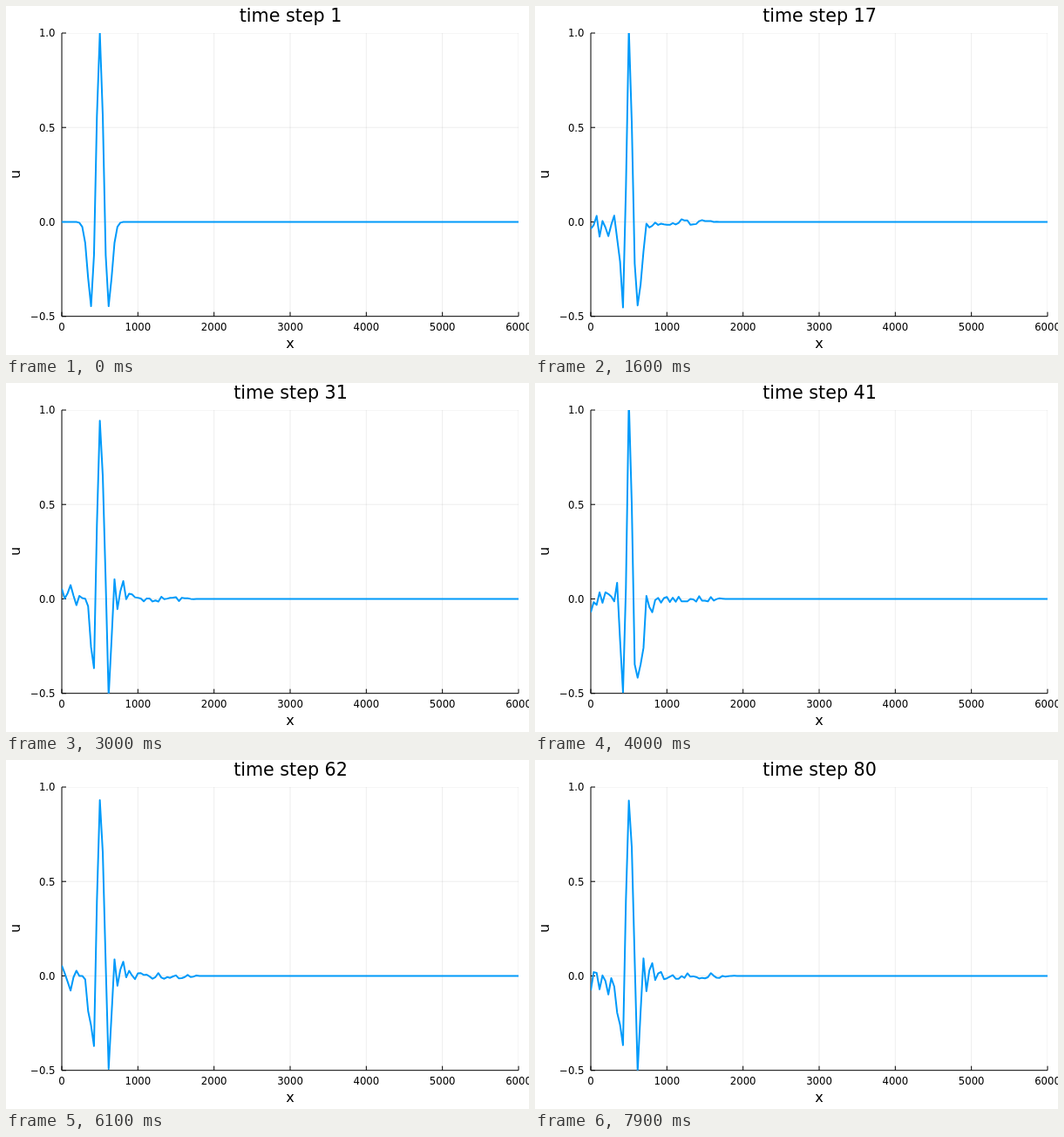
Write an HTML page with a canvas that moves like this. It is 600 px wide and 400 px high and loops after 8000 ms.

```html
<!DOCTYPE html>
<html lang="en">
<head>
<meta charset="utf-8">
<title>Wave over time</title>
<style>
html, body { margin: 0; width: 100%; height: 100%; overflow: hidden; background: #fff; }
canvas { display: block; }
</style>
</head>
<body>
<canvas width="600" height="400"></canvas>
<script>
const g = document.querySelector('canvas').getContext('2d');
const STEPS = 80, STEP_MS = 100, POINTS = 157, DX = 6000 / (POINTS - 1), PEAK = 13;
const LEFT = 64, RIGHT = 588, TOP = 31, BOTTOM = 355.7;
const px = x => LEFT + x / 6000 * (RIGHT - LEFT);
const py = u => BOTTOM - (u + 0.5) / 1.5 * (BOTTOM - TOP);

// Seeded random number in 0..1
function rand(n) {
  const v = Math.sin(n * 12.9898 + 4.1) * 43758.5453;
  return v - Math.floor(v);
}

// Ricker wavelet at grid point i
function pulse(i, squeeze = 1) {
  const a = 0.168 * (i - PEAK) ** 2 * squeeze;
  return (1 - 2 * a) * Math.exp(-a);
}

// Every third grid point moves freely, its neighbours much less
const freedom = i => [1, -0.25, 0.4][i % 3];

// Trapped oscillation just right of the peak, in antiphase left of the pulse
function swing(i, step) {
  const side = i < PEAK - 3 ? -1 : 1;
  const size = 0.27 * Math.exp(-(((i - 15) / 5.5) ** 2));
  return side * size * freedom(i) * Math.cos(2 * Math.PI * (step - 31) / 6.125);
}

// Small irregular waves behind a slowly advancing front
function ripple(i, step) {
  const size = i < PEAK - 3 ? 0.08 * freedom(i) : 0.015;
  const front = 36 + Math.sqrt(step);
  const phase = 2 * Math.PI * rand(i) + step * (0.4 + 0.8 * rand(i + 99));
  return size * Math.sin(phase) / (1 + Math.exp((i - front) / 1.2));
}

// The left flank narrows while the oscillations set in
function height(i, step) {
  const settled = 1 - Math.exp((1 - step) / 3);
  const rest = pulse(i, i < PEAK ? 2.1 : 1);
  return pulse(i) + settled * (rest - pulse(i) + swing(i, step) + ripple(i, step));
}

function line(x1, y1, x2, y2) {
  g.beginPath();
  g.moveTo(x1, y1);
  g.lineTo(x2, y2);
  g.stroke();
}

function text(str, x, y, size, align = 'center') {
  g.font = `${size}px "DejaVu Sans", sans-serif`;
  g.textAlign = align;
  g.fillText(str, x, y);
}

function clipped(paint) {
  g.save();
  g.beginPath();
  g.rect(LEFT, TOP, RIGHT - LEFT, BOTTOM - TOP);
  g.clip();
  paint();
  g.restore();
}

function axes() {
  const xs = [0, 1000, 2000, 3000, 4000, 5000, 6000], us = [-0.5, 0, 0.5, 1];
  g.lineWidth = 1;
  clipped(() => {
    g.strokeStyle = 'rgba(0,0,0,0.07)';
    xs.forEach(x => line(px(x), TOP, px(x), BOTTOM));
    us.forEach(u => line(LEFT, py(u), RIGHT, py(u)));
  });
  g.strokeStyle = g.fillStyle = '#000';
  line(LEFT, BOTTOM, RIGHT, BOTTOM);
  line(LEFT, TOP, LEFT, BOTTOM);
  xs.forEach(x => {
    line(px(x), BOTTOM, px(x), BOTTOM - 5);
    text(x, px(x), 371.5, 11.7);
  });
  us.forEach(u => {
    line(LEFT, py(u), LEFT + 5, py(u));
    text(u.toFixed(1).replace('-', '\u2212'), 56.5, py(u) + 4.3, 11.7, 'right');
  });
  text('x', 326, 391.5, 16.1);
  g.save();
  g.translate(16, 192.9);
  g.rotate(-Math.PI / 2);
  text('u', 0, 0, 16.1);
  g.restore();
}

function curve(step) {
  g.beginPath();
  for (let i = 0; i < POINTS; i++) g.lineTo(px(i * DX), py(height(i, step)));
  g.strokeStyle = '#009afa';
  g.lineWidth = 2;
  g.lineJoin = 'round';
  g.stroke();
}

function draw(step) {
  g.fillStyle = '#fff';
  g.fillRect(0, 0, 600, 400);
  axes();
  text('time step ' + step, 326.5, 18.3, 20.65);
  clipped(() => curve(step));
}

const start = performance.now();
function tick() {
  const t = performance.now() - start;
  draw(1 + Math.floor(t / STEP_MS) % STEPS);
  requestAnimationFrame(tick);
}
tick();
</script>
</body>
</html>
```
